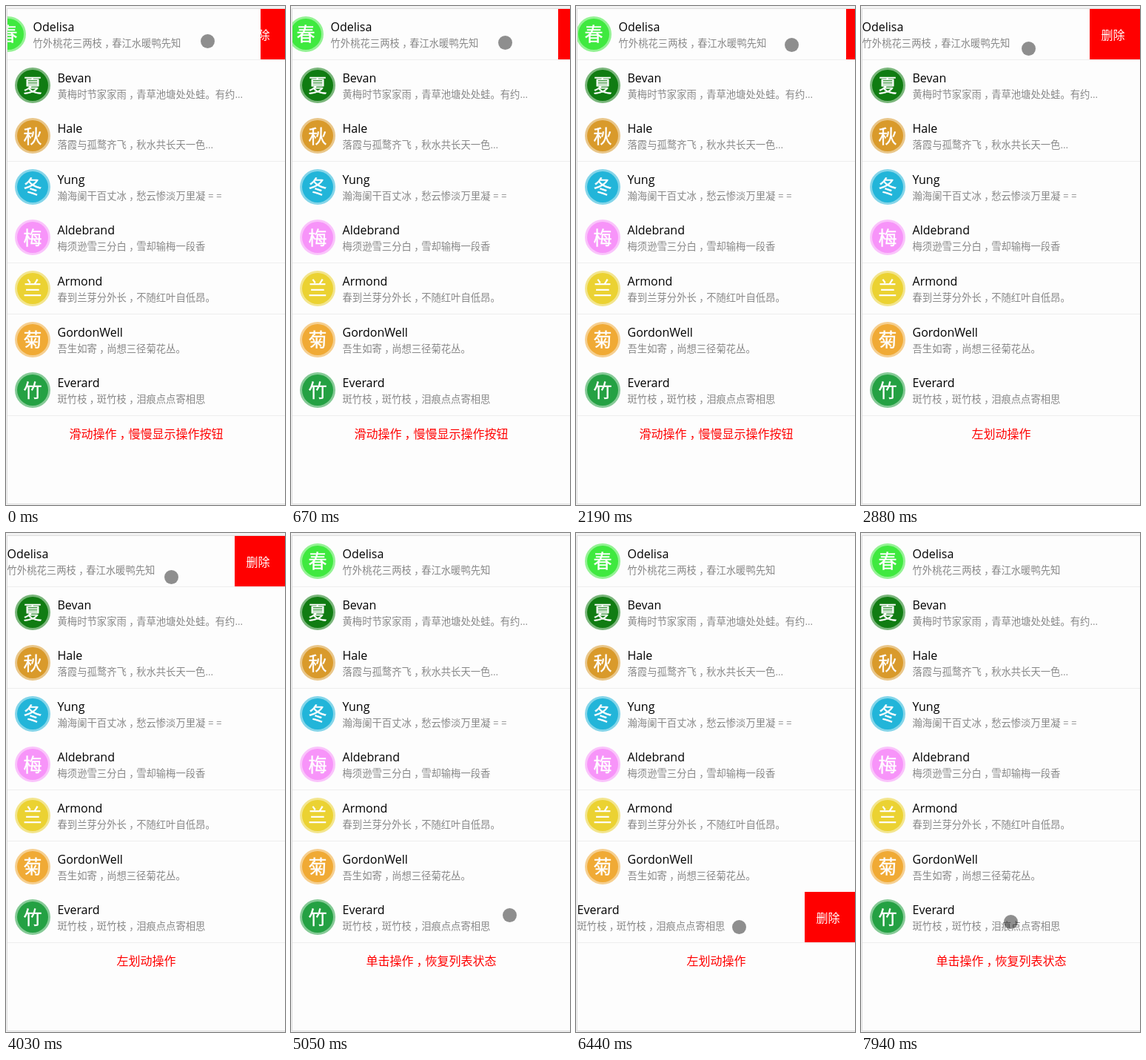
An HTML page for the animation above (8000 ms loop, 377 px wide and 673 px high).

```html
<!DOCTYPE html>
<html lang="zh-CN">
<head>
<meta charset="utf-8">
<title>滑动列表</title>
<style>
  html, body { margin: 0; width: 100%; height: 100%; overflow: hidden; background: #f3f3f3; }
  svg { display: block; width: 377px; height: 673px; }
  text { font-family: "Open Sans", "Noto Sans CJK SC", "Noto Sans CJK", sans-serif; font-size: 16px; white-space: pre; }
  .poem { font-size: 13.333px; fill: #888; }
  .glyph { font-size: 25px; fill: #fff; stroke: #fff; stroke-width: .4px; text-anchor: middle; }
  .button { fill: #fff; text-anchor: middle; }
  .caption { fill: #f00; text-anchor: middle; }
</style>
</head>
<body>
<svg viewBox="0 0 377 673">
  <defs><clipPath id="page"><rect x="2" y="4" width="375" height="667"/></clipPath></defs>
  <rect x="1" y="3" width="380" height="669" fill="#ddd"/>
  <rect x="2" y="4" width="375" height="667" fill="#fdfdfd"/>
  <g id="list" clip-path="url(#page)"></g>
  <text id="caption" class="caption" x="189.5" y="583"></text>
  <circle id="touch" r="9.5" fill="#000" fill-opacity=".44"/>
</svg>
<script>
const LOOP = 8000, FRAME = 140, OPEN = -68, PITCH = 68.6;
const SLIDE = '滑动操作，慢慢显示操作按钮';
const SWIPED = '左划动操作';
const TAPPED = '单击操作，恢复列表状态';

const contacts = [
  ['Odelisa', '春', '#3fe93f', '竹外桃花三两枝，春江水暖鸭先知'],
  ['Bevan', '夏', '#107c12', '黄梅时节家家雨，青草池塘处处蛙。有约...'],
  ['Hale', '秋', '#d99a2b', '落霞与孤鹜齐飞，秋水共长天一色...'],
  ['Yung', '冬', '#22b5d9', '瀚海阑干百丈冰，愁云惨淡万里凝 = ='],
  ['Aldebrand', '梅', '#f794f9', '梅须逊雪三分白，雪却输梅一段香'],
  ['Armond', '兰', '#ebd232', '春到兰芽分外长，不随红叶自低昂。'],
  ['GordonWell', '菊', '#f0aa35', '吾生如寄，尚想三径菊花丛。'],
  ['Everard', '竹', '#24a143', '斑竹枝，斑竹枝，泪痕点点寄相思']
];
const ruledRows = [0, 2, 4, 5, 7];

// Turning points and rests of the finger
const keys = [
  { t: 0, x: 272, y: 47 }, { t: 400, x: 305, y: 47 },
  { t: 1080, x: 225, y: 57 }, { t: 1350, x: 259, y: 56 },
  { t: 1910, x: 303, y: 52 }, { t: 2190, x: 291, y: 52 },
  { t: 2730, x: 226, y: 57 }, { t: 3450, x: 226, y: 57 },
  { t: 4030, x: 223, y: 59 }, { t: 4180, x: 223, y: 59 },
  { t: 4630, x: 282, y: 434 }, { t: 5050, x: 295, y: 515 },
  { t: 5590, x: 224, y: 517 }, { t: 6010, x: 224, y: 517 },
  { t: 6440, x: 220, y: 531 }, { t: 7260, x: 220, y: 531 },
  { t: 7670, x: 202, y: 524 }, { t: LOOP, x: 202, y: 524 }
];
const gestures = [
  { t: 0, caption: SLIDE, row: 0 }, { t: 2880, caption: SWIPED, row: 0 }, { t: 4180, caption: TAPPED, row: 0 },
  { t: 5190, caption: SLIDE, row: 7 }, { t: 6290, caption: SWIPED, row: 7 }, { t: 7800, caption: TAPPED, row: 7 }
];

const lastAt = (list, t) => list.findLast(entry => entry.t <= t);
const clamp = v => Math.max(OPEN, Math.min(0, v));

// While dragging, the row follows the finger but stops at either end.
keys.forEach((key, i) => {
  const prev = keys[i - 1];
  if (!prev) key.offset = -33;
  else if (lastAt(gestures, key.t).caption === SLIDE) key.offset = clamp(prev.offset + key.x - prev.x);
  else key.offset = 0;
});

function touchAt(t) {
  const from = lastAt(keys, t), to = keys[keys.indexOf(from) + 1];
  const count = Math.max(1, Math.round((to.t - from.t) / FRAME));
  const u = Math.floor(count * (t - from.t) / (to.t - from.t)) / count;
  const x = from.x + (to.x - from.x) * u;
  const y = from.y + (to.y - from.y) * u;
  return { x, y, dragged: clamp(from.offset + x - from.x) };
}

// Full-width commas sit in the middle of their cell.
const centreCommas = text => text.replace(/，(.)/g, '<tspan dx=".25em -.25em">，$1</tspan>');

function rowMarkup([name, glyph, color, poem], i) {
  const at = y => Math.round(y + PITCH * i);
  const rule = ruledRows.includes(i) ? `<rect x="2" y="${at(72)}" width="375" height="1" fill="#eee"/>` : '';
  return `<rect x="309" y="${at(4)}" width="68" height="68" fill="#f00"/>
    <text class="button" x="340.5" y="${at(45)}">删除</text>
    <g class="row">
      <rect x="2" y="${at(4)}" width="375" height="68" fill="#fdfdfd"/>
      <circle cx="36" cy="${at(38)}" r="24" fill="${color}" opacity=".55"/>
      <circle cx="36" cy="${at(38)}" r="21" fill="${color}"/>
      <text class="glyph" x="36" y="${at(47.4)}">${glyph}</text>
      <text x="69.5" y="${at(34)}">${name}</text>
      <text class="poem" x="69.5" y="${at(55)}">${centreCommas(poem)}</text>
    </g>${rule}`;
}

const list = document.getElementById('list');
const captionText = document.getElementById('caption');
const touch = document.getElementById('touch');
list.innerHTML = '<rect x="2" y="4" width="375" height="549" fill="#fdfdfd"/>' + contacts.map(rowMarkup).join('');
const rows = list.querySelectorAll('.row');
let shown;

function render(t) {
  const { x, y, dragged } = touchAt(t);
  const { caption, row } = lastAt(gestures, t);
  const offset = { [SLIDE]: dragged, [SWIPED]: OPEN, [TAPPED]: 0 }[caption];
  rows.forEach((g, i) => g.setAttribute('transform', `translate(${i === row ? Math.round(offset) : 0} 0)`));
  touch.setAttribute('cx', Math.round(x) + .5);
  touch.setAttribute('cy', Math.round(y) + .5);
  if (shown !== caption) captionText.innerHTML = centreCommas(shown = caption);
}

const start = performance.now();
function tick() {
  render((performance.now() - start) % LOOP);
  requestAnimationFrame(tick);
}
tick();
</script>
</body>
</html>
```
